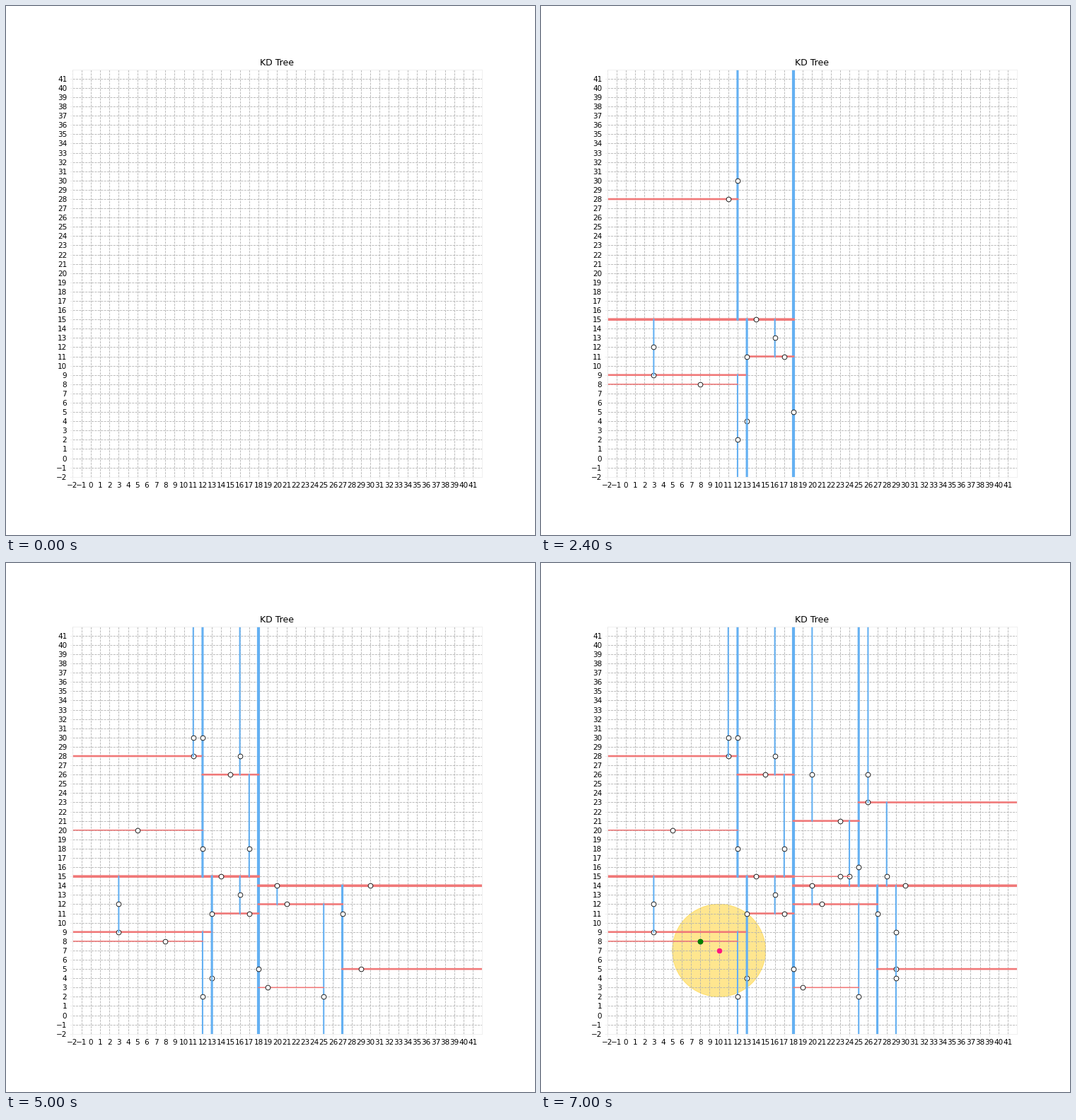
Write a matplotlib script that moves like this. It is 748 px wide and 748 px high and loops after 7.2 s.

```python
import matplotlib.pyplot as plt
import numpy as np
from matplotlib.animation import FuncAnimation
from matplotlib.patches import Circle

SIZE, INCHES = 748, 10
LOW, HIGH = -2, 42
COLORS = "#64b0f2", "#f07878"
FAINT = "#eeeeee"
STEPS, STEP_MS = 36, 200

# Data set: the y values found at each x.
COLUMNS = {
    3: (9, 12), 5: (20,), 8: (8,), 11: (28, 30), 12: (2, 18, 30),
    13: (4, 11), 14: (15,), 15: (26,), 16: (13, 28), 17: (11, 18),
    18: (5,), 19: (3,), 20: (14, 26), 21: (12,), 23: (15, 21), 24: (15,),
    25: (2, 16), 26: (23, 26), 27: (11,), 28: (15,), 29: (4, 5, 9), 30: (14,),
}
POINTS = [(x, y) for x, ys in COLUMNS.items() for y in ys]
QUERY, RADIUS = (10, 7), 5
NEAREST = min(POINTS, key=lambda p: np.hypot(p[0] - QUERY[0], p[1] - QUERY[1]))


def build(points, box=((LOW, HIGH), (LOW, HIGH)), depth=0):
    """Yield (point, depth, extent of the split line) in preorder."""
    if not points:
        return
    axis = depth % 2
    points = sorted(points, key=lambda p: p[axis])
    mid = len(points) // 2
    point = points[mid]
    yield point, depth, box[1 - axis]
    lo, hi = box[axis]
    halves = (points[:mid], (lo, point[axis])), (points[mid + 1:], (point[axis], hi))
    for half, span in halves:
        child = (span, box[1]) if axis == 0 else (box[0], span)
        yield from build(half, child, depth + 1)


plt.rcParams["font.family"] = "DejaVu Sans"
fig, ax = plt.subplots(figsize=(INCHES, INCHES), dpi=SIZE / INCHES)
fig.subplots_adjust(left=0.125, right=0.9, bottom=0.11, top=0.88)
ticks = np.arange(LOW, HIGH)
ax.set(xlim=(LOW, HIGH), ylim=(LOW, HIGH), xticks=ticks, yticks=ticks)
ax.set_title("KD Tree", fontsize=12)
ax.tick_params(labelsize=10, color=FAINT, labelcolor="black")
ax.grid(linestyle="--", linewidth=0.8, color="#b0b0b0")
for spine in ax.spines.values():
    spine.set_color(FAINT)


def dot(point, face, edge, **style):
    return ax.plot(*point, "o", ms=6.5, mfc=face, mec=edge, mew=0.8, **style)[0]


def add_node(point, depth, span):
    axis = depth % 2
    level = (point[axis],) * 2
    ends = (span, level) if axis else (level, span)
    line, = ax.plot(*ends, color=COLORS[axis], lw=4 - depth / 2, snap=False)
    return line, dot(point, "white", "black")


nodes = [add_node(*node) for node in build(POINTS)]
search = [
    ax.add_patch(Circle(QUERY, RADIUS, color="#ffcf20", alpha=0.5)),
    dot(NEAREST, "green", "green", zorder=3),
    dot(QUERY, "#ff1480", "#ff1480", zorder=3),
]


def update(step):
    for i, parts in enumerate(nodes):
        for part in parts:
            part.set_visible(i < step)
    for part in search:
        part.set_visible(step == STEPS - 1)
    return []


anim = FuncAnimation(fig, update, frames=STEPS, interval=STEP_MS,
                     init_func=lambda: update(0), repeat=True, repeat_delay=0)
plt.show()
```
